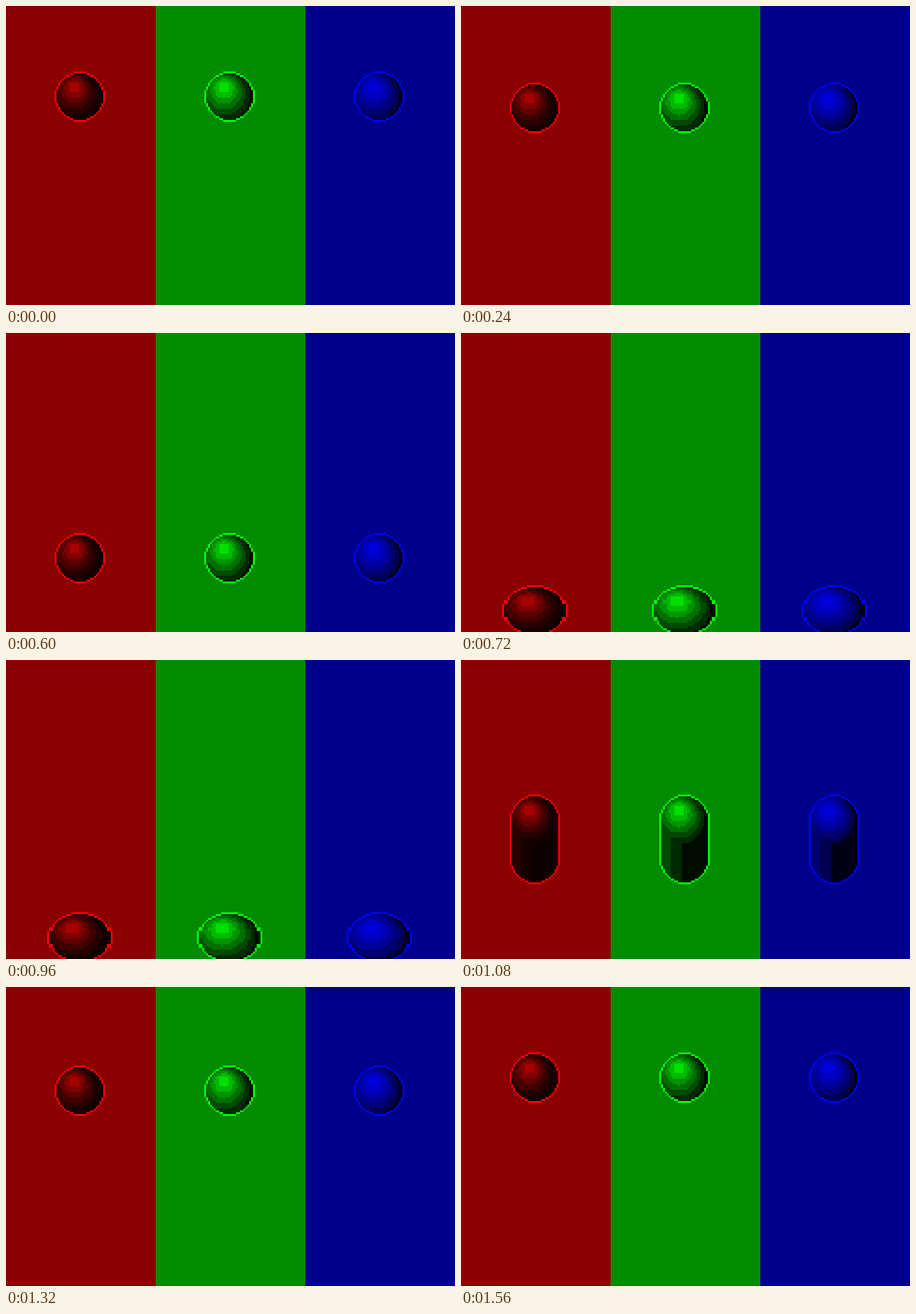
An HTML page with a canvas that plays this animation: 480 by 320 pixels, repeating every 1680 ms.

```html
<!DOCTYPE html>
<html lang="en">
<head>
<meta charset="utf-8">
<title>Bouncing balls</title>
<style>
  html, body { margin: 0; width: 100%; height: 100%; overflow: hidden; background: #000; }
  canvas { display: block; width: 480px; height: 320px; image-rendering: pixelated; }
</style>
</head>
<body>
<canvas id="stage" width="240" height="160"></canvas>
<script>
const ctx = document.getElementById('stage').getContext('2d');
const STEP = 120, COUNT = 14, SIZE = 27, MID = 13;
const APEX = 35, IMPACT = 7, LAUNCH = 9;
const LAYERS = 6;

const COLUMNS = [
  { rgb: v => `rgb(${v},0,0)`, dark: 12, peak: 168, gamma: 1.6 },
  { rgb: v => `rgb(0,${v},0)`, dark: 12, peak: 224, gamma: 1.1 },
  { rgb: v => `rgb(0,0,${v})`, dark: 24, peak: 220, gamma: 0.7 }
];

const lerp = (a, b, t) => a + (b - a) * t;

// Accelerating fall, squash on the floor, stretched launch, slowing rise
function poseAt(n) {
  const squash = Math.max(0, 2 - Math.abs(n - IMPACT));
  const drop = squash ? 92 + 8 * squash
    : n < IMPACT ? 0.917 * n ** 2.71
    : Math.max(0, 2.5 * 2 ** (COUNT - 1 - n) - 3);
  return {
    top: APEX + Math.round(drop),
    width: SIZE + 4 * squash * (squash + 1),
    height: n === LAUNCH ? 48 : SIZE
  };
}

// A circle, or a capsule when the body is taller than it is wide
function inside(u, v, height) {
  const cy = Math.min(Math.max(v, MID), height - 1 - MID);
  return Math.hypot(u - MID, v - cy) <= 13.4;
}

function isRim(u, v, height) {
  return !(inside(u - 1, v, height) && inside(u + 1, v, height) &&
           inside(u, v - 1, height) && inside(u, v + 1, height));
}

// Nested discs shrink towards the highlight; a long body adds side shading
function levelAt(u, v, height) {
  let level = 0;
  for (let i = 0; i < LAYERS; i++) {
    const t = i / (LAYERS - 1);
    if (Math.hypot(u - 10, v - lerp(12.5, 8, t)) < lerp(13.5, 3, t)) level = i + 1;
  }
  const side = height > SIZE && v > MID ? 2 - Math.floor(u / 6) : 0;
  return Math.max(level, side);
}

function drawBall(cx, { top, width, height }, { rgb, dark, peak, gamma }) {
  const left = cx - (width - 1) / 2;
  for (let v = 0; v < height; v++) {
    for (let x = 0; x < width; x++) {
      const u = Math.floor((x + 0.5) * SIZE / width);
      if (!inside(u, v, height)) continue;
      const light = (levelAt(u, v, height) / LAYERS) ** gamma;
      ctx.fillStyle = rgb(isRim(u, v, height) ? 255 : Math.round(lerp(dark, peak, light)));
      ctx.fillRect(left + x, top + v, 1, 1);
    }
  }
}

function draw(pose) {
  COLUMNS.forEach((col, i) => {
    ctx.fillStyle = col.rgb(139);
    ctx.fillRect(i * 80, 0, 80, 160);
    drawBall(i * 80 + 39, pose, col);
  });
}

let shown = -1;
const start = performance.now();
function tick() {
  const t = Math.max(0, performance.now() - start);
  const n = Math.floor(t / STEP) % COUNT;
  if (n !== shown) draw(poseAt(shown = n));
  requestAnimationFrame(tick);
}
tick();
</script>
</body>
</html>
```
